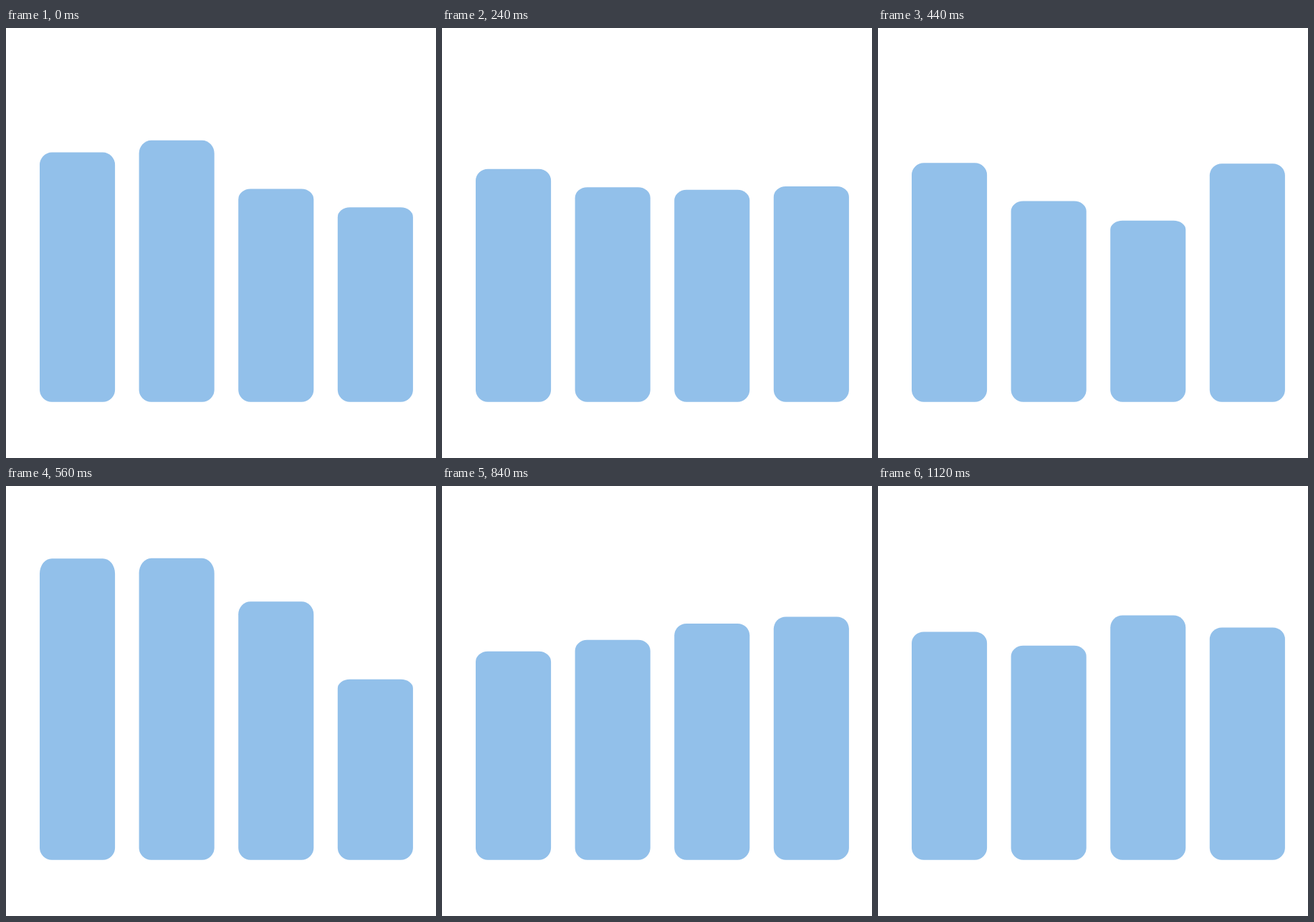
These frames come from a looping animation (600x600 px, 1.16 s). An HTML page:

```html
<!DOCTYPE html>
<html lang="en">
<head>
<meta charset="utf-8">
<title>Bars</title>
<style>
  html, body { margin: 0; width: 100%; height: 100%; overflow: hidden; background: #fff; }
  svg { display: block; }
  path { fill: #92c0ea; }
</style>
</head>
<body>
<svg id="stage" width="600" height="600" viewBox="0 0 600 600"></svg>
<script>
  const LOOP = 1160, STEP = 40;
  const LEFT = 47, PITCH = 138.6, WIDTH = 105.1, BASE = 521.8, RADIUS = 17;

  // Key poses: the top edge of each bar at shared times.
  const times = [0, 160, 360, 560, 720, 840, 1120];
  const bars = [
    [173.6, 154.6, 254.2, 101.2, 322.2, 230.8, 203.4],
    [156.8, 146.3, 326, 100.8, 273.2, 214.8, 222.8],
    [224.5, 171, 314.6, 161.2, 127, 192, 180.4],
    [250.3, 275.7, 137.2, 269.8, 99.2, 182.4, 197.4]
  ];

  // Smooth periodic curve through the key poses.
  function topAt(tops, t) {
    const n = times.length;
    const at = i => times[(i + n) % n] + Math.floor(i / n) * LOOP;
    const top = i => tops[(i + n) % n];
    const rate = i => (top(i + 1) - top(i)) / (at(i + 1) - at(i));
    const slope = i => {
      const before = at(i) - at(i - 1), after = at(i + 1) - at(i);
      return (rate(i - 1) * after + rate(i) * before) / (before + after);
    };
    const i = times.findLastIndex(time => time <= t);
    const d = at(i + 1) - at(i), u = (t - at(i)) / d, v = 1 - u;
    return top(i) * v * v * (1 + 2 * u) + top(i + 1) * u * u * (1 + 2 * v)
      + d * u * v * (slope(i) * v - slope(i + 1) * u);
  }

  // The upper corners stretch with the bar, the lower ones stay round.
  function outline(x, top) {
    const r = RADIUS, ry = (BASE - top) * 0.05;
    const w = WIDTH - 2 * r, h = BASE - top - ry - r;
    return `path("M${x} ${top + ry}a${r} ${ry} 0 0 1 ${r} ${-ry}h${w}` +
      `a${r} ${ry} 0 0 1 ${r} ${ry}v${h}a${r} ${r} 0 0 1 ${-r} ${r}h${-w}` +
      `a${r} ${r} 0 0 1 ${-r} ${-r}z")`;
  }

  bars.forEach((tops, i) => {
    const bar = document.createElementNS('http://www.w3.org/2000/svg', 'path');
    document.getElementById('stage').append(bar);

    const steps = [];
    for (let t = 0; t <= LOOP; t += STEP) {
      if (t === STEP) continue; // the first pose is held twice as long
      const d = outline(LEFT + i * PITCH, topAt(tops, t % LOOP));
      steps.push({ d, offset: t / LOOP, easing: 'step-end' });
    }
    bar.animate(steps, { duration: LOOP, iterations: Infinity });
  });
</script>
</body>
</html>
```
